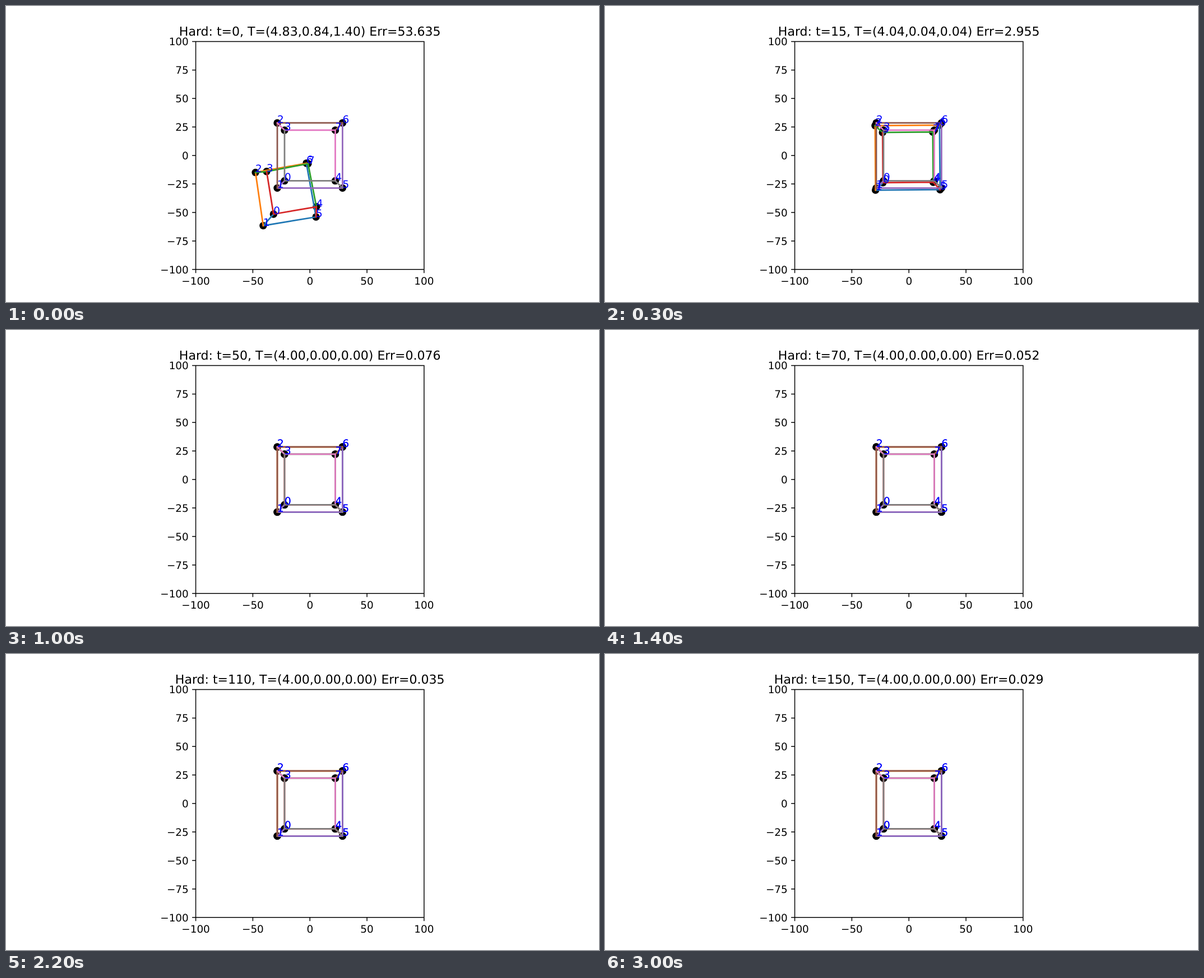
Animation, 1058 px wide and 529 px high, one loop 3100 ms. Source, as an HTML page:

```html
<!DOCTYPE html>
<html lang="en">
<head>
<meta charset="utf-8">
<title>Cube pose convergence</title>
<style>
  html, body { margin: 0; width: 100%; height: 100%; overflow: hidden; background: #fff; }
  svg { display: block; width: 1058px; height: 529px; }
  text { font-family: "DejaVu Sans", sans-serif; font-size: 18.37px; text-rendering: geometricPrecision; }
  #title { font-size: 22.04px; text-anchor: middle; }
  #axes { fill: none; stroke: #000; stroke-width: 1.47; }
  #xlabels { text-anchor: middle; }
  #ylabels { text-anchor: end; }
  #edges { fill: none; stroke-width: 2.755; stroke-linejoin: round; stroke-linecap: square; }
  #names { fill: #00f; }
</style>
</head>
<body>
<svg viewBox="0 0 1058 529">
  <g id="dots"></g>
  <g id="edges"></g>
  <path id="axes"/>
  <g id="xlabels"></g>
  <g id="ylabels"></g>
  <g id="names"></g>
  <text id="title" x="542.2" y="52.6"></text>
</svg>
<script>
const $ = id => document.getElementById(id);
const CX = 542.22, CY = 267.15, SCALE = 2.0367;
const px = x => CX + x * SCALE;
const py = y => CY - y * SCALE;

function add(parent, tag, attrs = {}, text = '') {
  const el = document.createElementNS('http://www.w3.org/2000/svg', tag);
  for (const key in attrs) el.setAttribute(key, attrs[key]);
  el.textContent = text;
  $(parent).append(el);
  return el;
}

function drawAxes() {
  const left = px(-100), right = px(100), top = py(100), bottom = py(-100);
  const label = v => String(v).replace('-', '\u2212');
  let d = `M${left} ${top}H${right}V${bottom}H${left}Z`;
  for (let v = -100; v <= 100; v += 50) {
    d += `M${px(v)} ${bottom}v6.43`;
    add('xlabels', 'text', { x: px(v), y: 497.9 }, label(v));
  }
  for (let v = -100; v <= 100; v += 25) {
    d += `M${left} ${py(v)}h-6.43`;
    add('ylabels', 'text', { x: left - 12.86, y: py(v) + 7 }, label(v));
  }
  $('axes').setAttribute('d', d);
}

// Unit cube seen from distance 4 with focal length 200.
const goal = Array.from({ length: 8 }, (_, i) => {
  const near = i % 4 === 1 || i % 4 === 2;
  const r = 100 / (near ? 3.5 : 4.5);
  return [px(i < 4 ? -r : r), py(i % 4 < 2 ? -r : r)];
});
const start = [
  [477.3, 372], [458.9, 392.6], [445.1, 297.4], [465, 295.8],
  [553.8, 358.8], [553.1, 377], [535.9, 281], [538.9, 281.8]
];

// Each colour traces three edges, cycling round the cube.
const chains = [0, 1, 2, 3].map(k => [k, (k + 1) % 4, 4 + (k + 1) % 4, 4 + (k + 2) % 4]);

function makeCube(colors) {
  const dots = goal.map(() => add('dots', 'circle', { r: 6.7 }));
  const lines = colors.map(stroke => add('edges', 'polyline', { stroke }));
  const names = goal.map((_, i) => add('names', 'text', {}, i));
  return points => {
    points.forEach(([x, y], i) => {
      dots[i].setAttribute('cx', x);
      dots[i].setAttribute('cy', y);
      names[i].setAttribute('x', x);
      names[i].setAttribute('y', y);
    });
    lines.forEach((line, k) =>
      line.setAttribute('points', chains[k].map(i => points[i].join()).join(' ')));
  };
}

const FLOOR = 0.0257, SLOW = 0.15, START_ERR = 53.635;
function errorAt(t) {
  const fast = START_ERR - FLOOR - SLOW;
  return fast * Math.exp(-0.203281 * t + 0.00048545 * t * t)
    + SLOW * Math.exp(-0.025 * t) + FLOOR;
}

function poseAt(t) {
  return [
    4 + 0.83 * Math.exp(-0.202 * t),
    0.84 * Math.exp(-0.202 * t),
    1.4 * Math.exp(-0.237 * t)
  ].map(v => v.toFixed(2)).join();
}

drawAxes();
const moveCube = makeCube(['#1f77b4', '#ff7f0e', '#2ca02c', '#d62728']);
makeCube(['#9467bd', '#8c564b', '#e377c2', '#7f7f7f'])(goal);

function show(step) {
  const t = step * 5, err = errorAt(t), k = err / START_ERR;
  moveCube(goal.map((g, i) => g.map((v, j) => v + (start[i][j] - v) * k)));
  $('title').textContent = `Hard: t=${t}, T=(${poseAt(t)}) Err=${err.toFixed(3)}`;
}

const begin = performance.now();
let shown = 0;
show(0);
function tick(now) {
  const step = Math.floor(Math.max(0, now - begin) % 3100 / 100);
  if (step !== shown) show(shown = step);
  requestAnimationFrame(tick);
}
requestAnimationFrame(tick);
</script>
</body>
</html>
```
